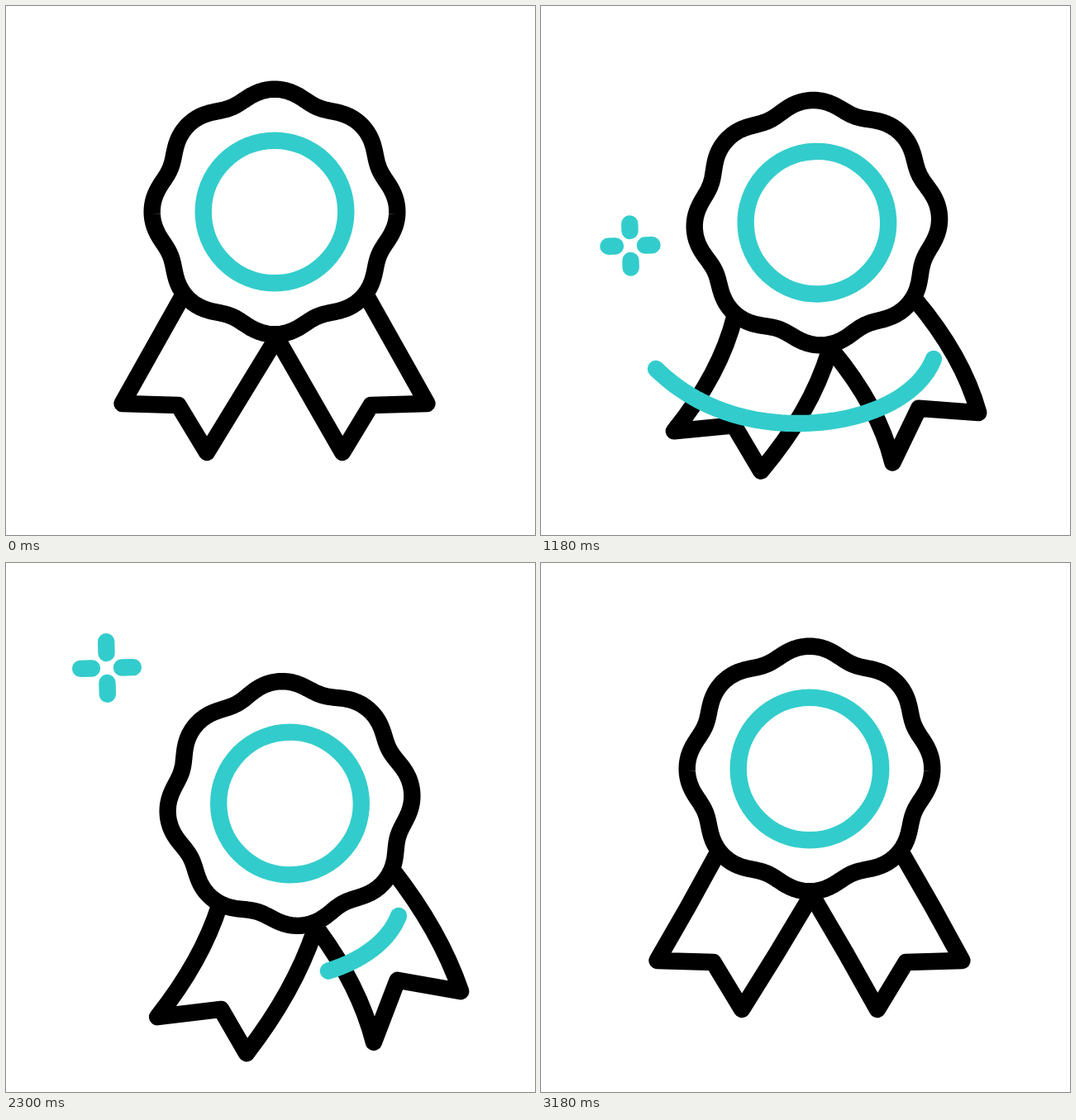
An HTML page with a canvas that plays this animation: 640x640 px, repeating every 3.2 s.

```html
<!DOCTYPE html>
<html lang="en">
<head>
<meta charset="utf-8">
<title>Award rosette</title>
<style>
  html, body { margin: 0; width: 100%; height: 100%; overflow: hidden; background: #fff; }
  canvas { display: block; width: 640px; height: 640px; }
</style>
</head>
<body>
<canvas id="stage"></canvas>
<script>
const LOOP = 3200, STEP = 20, INK = '#000', TEAL = '#33cccc', RAD = Math.PI / 180;
const canvas = document.getElementById('stage');
const ctx = canvas.getContext('2d');
const dpr = window.devicePixelRatio || 1;
canvas.width = canvas.height = 640 * dpr;

const ramp = (t, a, b) => Math.max(0, Math.min(1, (t - a) / (b - a)));
const ease = p => p * p * (3 - 2 * p);

// Adds up eased moves, each given as [start, end, distance].
const moves = (t, list) => list.reduce((sum, [a, b, d]) => sum + d * ease(ramp(t, a, b)), 0);

const sway = t => moves(t, [[100, 870, 18.4], [870, 1720, -31.4], [1720, 2290, 31.5], [2290, 3160, -18.5]]);
const height = t => 249 + moves(t, [[100, 650, -45], [670, 1500, 87], [2440, 3190, -42]]);

function turn(x, y, angle) {
  const c = Math.cos(angle), s = Math.sin(angle);
  return [x * c - y * s, x * s + y * c];
}

function stroke(color) {
  ctx.strokeStyle = color;
  ctx.stroke();
}

// Curve whose middle sits `bend` pixels beside the chord.
function bow(from, to, bend) {
  ctx.quadraticCurveTo((from[0] + to[0]) / 2 + 2 * bend, (from[1] + to[1]) / 2, to[0], to[1]);
}

// side is -1 for the left ribbon and 1 for the right one.
function ribbon(side, dx, angle, bend, droop) {
  const place = (x, y, turns, shiftX, shiftY) => {
    const p = turn(side * x, y, angle * turns);
    return [p[0] + shiftX, p[1] + shiftY];
  };
  const pull = Math.max(0, dx) / 2;
  const outerTop = place(112, 103, 1.9, -side * 0.3 * Math.abs(dx), 0);
  const innerTop = place(2, 156, 1.9, 2.5, 0);
  const outer = place(184.5, 232, 1, 0, droop);
  const notch = place(116.5, 234, 1, -side * pull, -side * droop / 2);
  const inner = place(82, 291, 1, -Math.max(0, side) * pull, droop / 2);
  ctx.beginPath();
  ctx.moveTo(...outerTop);
  bow(outerTop, outer, bend);
  ctx.lineTo(...notch);
  ctx.lineTo(...inner);
  bow(inner, innerTop, bend);
  stroke(INK);
}

function badge(angle) {
  ctx.save();
  ctx.rotate(angle);
  ctx.beginPath();
  for (let i = 0; i < 360; i++) {
    const a = i * RAD, r = 143 + 5.8 * Math.cos(8 * a) - 0.5 * Math.cos(16 * a);
    ctx.lineTo(r * Math.cos(a), r * Math.sin(a));
  }
  ctx.closePath();
  ctx.fillStyle = '#fff';
  ctx.fill();
  stroke(INK);
  ctx.beginPath();
  ctx.arc(0, 0, 86.3, 0, 2 * Math.PI);
  stroke(TEAL);
  ctx.restore();
}

function rosette(t) {
  const dx = sway(t), angle = -0.31 * dx * RAD;
  const bend = 0.62 * sway(t - 160);
  const hang = 41 * Math.cos(ramp(Math.abs(t - 1720), 0, 840) * Math.PI / 2) ** 2;
  ctx.save();
  ctx.translate(325 + dx, height(t));
  ribbon(-1, dx, angle, bend, hang);
  ribbon(1, dx, angle, bend, 0.8 * Math.max(0, dx));
  badge(angle);
  ctx.restore();
}

function bezier(a, b, c, d, p) {
  const q = 1 - p;
  return a * q * q * q + 3 * b * q * q * p + 3 * c * q * p * p + d * p * p * p;
}

// Position on the swoosh, 0 at the left end and 1 at the right.
function swooshAt(u) {
  const p = u < 0.5 ? u * 2 : u * 2 - 1;
  return u < 0.5
    ? [bezier(139, 185, 245, 310, p), bezier(439, 484, 505, 505, p)]
    : [bezier(310, 385, 455, 475, p), bezier(505, 505, 477, 427, p)];
}

function swoosh(from, to) {
  if (to - from < 0.001) return;
  ctx.beginPath();
  for (let i = 0; i <= 60; i++) ctx.lineTo(...swooshAt(from + (to - from) * i / 60));
  stroke(TEAL);
}

// Four petals grow outward, then shrink away towards their tips.
function sparkle(x, y, age) {
  if (age <= 0 || age >= 340) return;
  const near = 18 + 21 * ramp(age, 170, 340), far = 18 + 21 * ramp(age, 0, 170);
  ctx.save();
  ctx.translate(x, y);
  ctx.rotate(-1.5 * RAD);
  ctx.beginPath();
  for (let i = 0; i < 4; i++) {
    ctx.moveTo(near, 0);
    ctx.lineTo(far + 0.01, 0);
    ctx.rotate(Math.PI / 2);
  }
  stroke(TEAL);
  ctx.restore();
}

function draw(t) {
  ctx.setTransform(dpr, 0, 0, dpr, 0, 0);
  ctx.fillStyle = '#fff';
  ctx.fillRect(0, 0, 640, 640);
  ctx.lineWidth = 20.4;
  ctx.lineCap = ctx.lineJoin = 'round';
  rosette(t);
  if (t < 1600) swoosh(1 - ramp(t, 900, 1160), 1 - ramp(t, 1190, 1450));
  else swoosh(ramp(t, 2080, 2400), ramp(t, 1800, 2060));
  sparkle(518.7, 115.5, t - 825);
  sparkle(108, 290, t - 1111);
  sparkle(541, 290, t - 1880);
  sparkle(122, 127, t - 2188);
}

const begin = performance.now();
function frame() {
  const t = (performance.now() - begin) % LOOP;
  draw(Math.floor(t / STEP) * STEP);
  requestAnimationFrame(frame);
}
frame();
</script>
</body>
</html>
```
